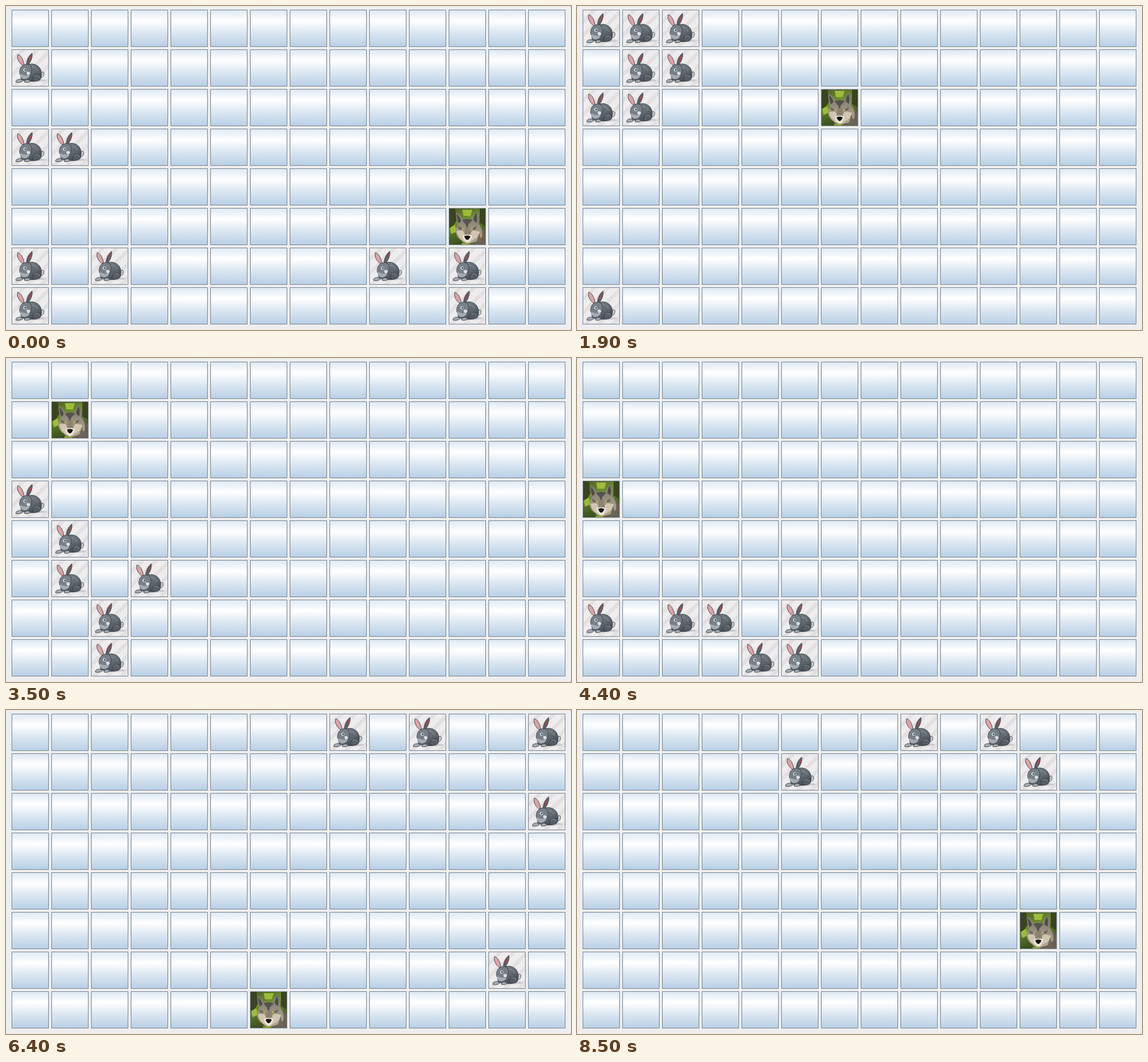
Animation of 910x523 px, one loop 8700 ms. Source, as an HTML page:

```html
<!DOCTYPE html>
<html lang="en">
<head>
<meta charset="utf-8">
<title>Wolf and rabbits</title>
<style>
  html, body { margin: 0; width: 100%; height: 100%; overflow: hidden; background: #eee; }
  svg { display: block; }
</style>
</head>
<body>
<svg id="stage" width="910" height="523" viewBox="0 0 910 523">
  <defs>
    <linearGradient id="steel" x2="0" y2="1">
      <stop offset="0" stop-color="#dde8f3"/>
      <stop offset=".3" stop-color="#fff"/>
      <stop offset=".6" stop-color="#dde8f3"/>
      <stop offset="1" stop-color="#b8cfe5"/>
    </linearGradient>
    <linearGradient id="fur" x2=".6" y2="1">
      <stop offset="0" stop-color="#7d858b"/>
      <stop offset=".6" stop-color="#626a71"/>
      <stop offset="1" stop-color="#444b52"/>
    </linearGradient>
    <linearGradient id="leaves" x2=".3" y2="1">
      <stop offset="0" stop-color="#4c5a22"/>
      <stop offset=".4" stop-color="#6d8f30"/>
      <stop offset="1" stop-color="#35491f"/>
    </linearGradient>
    <linearGradient id="coat" x2="0" y2="1">
      <stop offset="0" stop-color="#76736c"/>
      <stop offset=".5" stop-color="#97907f"/>
      <stop offset="1" stop-color="#b5a78f"/>
    </linearGradient>
    <clipPath id="inner"><path d="M1 1h58v58H1z"/></clipPath>
    <filter id="soft"><feGaussianBlur stdDeviation=".7"/></filter>

    <rect id="frame" x=".5" y=".5" width="59" height="59" fill="none" stroke="#7a8a99"/>
    <g id="cell">
      <path fill="url(#steel)" d="M0 0h60v60H0z"/>
      <use href="#frame"/>
    </g>

    <g id="rabbit">
      <g clip-path="url(#inner)">
        <path fill="#eeeced" d="M1 1h58v58H1z"/>
        <path stroke="#e3e0e1" stroke-width="6" d="M-4 24L24-4M-4 46L46-4M-4 68L68-4M18 68L68 18M40 68L68 40"/>
        <ellipse cx="34" cy="50" rx="22" ry="3" fill="#cfcdcf" filter="url(#soft)"/>
      </g>
      <g stroke="#343a40" stroke-width=".8" stroke-linejoin="round">
        <path fill="#c9cfd4" d="M46 39c3-4 7-3 6 1 0 4-3 6-6 5z"/>
        <path fill="url(#fur)" d="M22 27c8-6 19-4 24 4 3 6 3 13-1 18-7 4-20 3-29 0-2-5-1-11 1-16z"/>
        <path fill="#565d64" d="M35 45c3-4 10-5 12-1 1 5-3 7-9 7-4 0-5-3-3-6z"/>
        <path fill="#5a6067" d="M24 25C24 17 28 10 33 6c1 7-2 14-7 20z"/>
        <path fill="#dba3a6" d="M18 26C11 21 8 14 10 8c6 2 9 9 10 17z"/>
        <path fill="#788087" d="M14 31c3-7 11-9 16-5 3 3 3 11 0 15-5 4-13 4-16 0-2-3-1-7 0-10z"/>
        <path fill="#a4abb2" d="M7 51c2-3 7-4 11-1 0 3-7 4-11 3zM21 51c2-3 7-3 9 0 0 2-6 3-9 2z"/>
      </g>
      <path fill="#b4484b" d="M28 20c0-5 2-9 4-11 0 5-2 9-4 11z"/>
      <path fill="#a4acb2" d="M14 39c4 3 11 4 15 2 0 4-4 7-8 7-5 0-7-4-7-9z"/>
      <path fill="#d9dee2" d="M24 37c2-2 6-1 6 2 0 2-3 3-5 2z"/>
      <circle cx="21.500" cy="33" r="2.600" fill="#d5e2e9"/>
      <circle cx="22" cy="33" r="1.500" fill="#38505f"/>
      <path fill="none" stroke="#939ba2" d="M32 29c5-1 8 2 10 6M37 44c3-3 7-2 8 1"/>
      <use href="#frame"/>
    </g>

    <g id="wolf">
      <g clip-path="url(#inner)">
        <path fill="url(#leaves)" d="M0 0h60v60H0z"/>
        <g filter="url(#soft)">
          <path fill="#3a4420" d="M-2-2h12l3 22-6 10-9 4zM50-2h12v34l-12-8z"/>
          <path fill="#9dbb3c" d="M22 3h16l-3 10H24zM2 32l8-5 3 11-9 4z"/>
          <path fill="#6b6054" d="M44 26l11 7 7 8v21H25l10-10z"/>
          <path fill="url(#coat)" d="M12 7c6 3 9 8 11 12 5-2 10-2 14 0 1-6 4-11 8-14 3 7 4 14 3 20 5 6 7 14 6 21-5 7-11 9-17 10-7 3-13 1-17-4-5-3-9-9-9-16 1-4 2-7 4-10-3-6-4-12-3-19z"/>
          <path fill="#504c45" d="M13 10c4 3 6 7 7 11l-4 4c-2-5-3-10-3-15zM44 8c2 5 2 11 1 16l-5-4c0-5 2-9 4-12z"/>
          <path fill="#55534e" d="M22 20c5-3 11-3 16 0l-6 6-2 8-3-8z"/>
          <path fill="#d2c6b2" d="M13 37l9-1 5 7h7l5-7 11 2c-1 8-6 12-12 14l-7 5-8-4c-5-4-9-9-10-16z"/>
          <path fill="#8d8170" d="M27 31h7l2 14h-11z"/>
          <path fill="#f0e9dd" d="M22 45l5-2h7l4 2-4 9-4 2-5-4z"/>
          <path fill="#6d665a" d="M15 29l9 5-2 2-6-2zM45 29l-9 5 2 2 6-2zM49 41l4 14-9 3z"/>
          <path fill="#141513" d="M25 46c2-2 8-2 10 0l-2 4-3 2-3-2z"/>
          <path fill="#8fa434" d="M21 56l7 1 5-1 1 4H21z"/>
        </g>
        <circle cx="22.500" cy="34" r="1.300" fill="#dcb650"/>
        <circle cx="37.500" cy="34" r="1.300" fill="#dcb650"/>
      </g>
      <use href="#frame"/>
    </g>
  </defs>
</svg>
<script>
const COLS = 14, ROWS = 8, PITCH = 64, LOOP = 8700;
const stage = document.getElementById('stage');

// Key poses: the wolf first, then the rabbits, those eaten earliest at the end.
// Each pose is reached in a number of even hops from the one before.
const poses = [
  { at: 0, hops: 1, cells: 'l6 b4 j7 c7 a8 l7 a4 a7 a2 l8' },
  { at: 800, hops: 5, cells: 'l8 b3 g4 b5 a6 g6 a3 a5 b1' },
  { at: 1900, hops: 7, cells: 'g3 b1 c2 b3 a8 b2 a1 a3 c1' },
  { at: 2700, hops: 6, cells: 'c1 b4 a6 b6 a8 a7 a2 a4' },
  { at: 4400, hops: 9, cells: 'a4 c7 d7 f7 e8 f8 a7' },
  { at: 5000, hops: 4, cells: 'a6 e8 g7 h6 g8 h8' },
  { at: 6400, hops: 5, cells: 'g8 i1 k1 n1 n3 m7' },
  { at: 7200, hops: 2, cells: 'j4 i1 k1 n1 i2 n7' },
  { at: 7800, hops: 2, cells: 'n8 i1 k1 j2 h1' },
  { at: 8100, hops: 1, cells: 'n8 i1 k1 l2 h1' },
  { at: 8500, hops: 1, cells: 'l6 i1 k1 l2 f2' }
].map(pose => ({
  ...pose,
  cells: pose.cells.split(' ').map(([col, row]) => [parseInt(col, 36) - 10, row - 1])
}));

function place(el, [col, row]) {
  el.setAttribute('transform', `translate(${9 + col * PITCH} ${6 + row * PITCH})`);
}

function add(id, cell) {
  const el = document.createElementNS('http://www.w3.org/2000/svg', 'use');
  el.setAttribute('href', '#' + id);
  place(el, cell);
  return stage.appendChild(el);
}

for (let i = 0; i < COLS * ROWS; i++) add('cell', [i % COLS, Math.floor(i / COLS)]);
const animals = poses[0].cells.map((cell, i) => add(i ? 'rabbit' : 'wolf', cell));
stage.append(animals[0]);

// Share of the way to the next pose; hops fall on tenths of a second.
function progress(from, to, time) {
  let hop = 0;
  const hopTime = n => Math.floor((from.at + (to.at - from.at) * n / to.hops) / 100) * 100;
  while (hop < to.hops && hopTime(hop + 1) <= time) hop++;
  return hop / to.hops;
}

function draw() {
  const time = Math.max(0, performance.now() - start) % LOOP;
  const i = poses.findLastIndex(pose => pose.at <= time);
  const from = poses[i], to = poses[i + 1] || from;
  const part = to === from ? 0 : progress(from, to, time);
  animals.forEach((el, n) => {
    const a = from.cells[n], b = to.cells[n] || a;
    el.style.display = a ? '' : 'none';
    if (a) place(el, a.map((v, axis) => Math.round(v + (b[axis] - v) * part)));
  });
  requestAnimationFrame(draw);
}

const start = performance.now();
draw();
</script>
</body>
</html>
```
